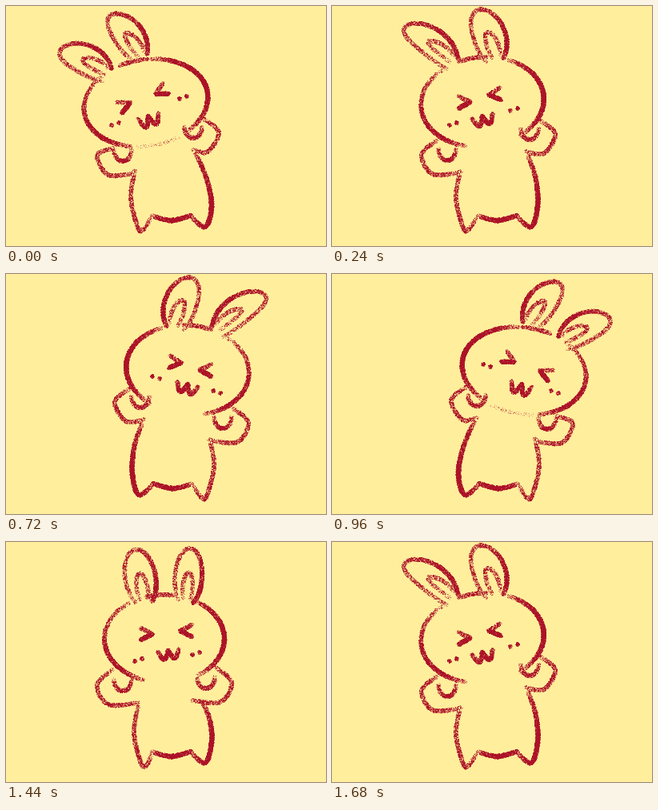
An HTML page with a canvas for the animation above (1.92 s loop, 400 px wide and 300 px high).

```html
<!DOCTYPE html>
<html lang="en">
<head>
<meta charset="utf-8">
<title>Dancing rabbit</title>
<style>
html, body { margin: 0; width: 100%; height: 100%; overflow: hidden; background: #ffee9c; }
canvas { display: block; width: 100%; height: 100%; }
</style>
</head>
<body>
<canvas id="stage" width="400" height="300"></canvas>
<script>
const W = 400, H = 300, STEP = 240, AXIS = 415;
const INK = [172, 18, 40], PAPER = '#ffee9c';
const DEG = Math.PI / 180;

let seed = 7;
const rand = () => {
  seed = (seed + 0x6D2B79F5) | 0;
  let t = Math.imul(seed ^ (seed >>> 15), 1 | seed);
  t = (t + Math.imul(t ^ (t >>> 7), 61 | t)) ^ t;
  return ((t ^ (t >>> 14)) >>> 0) / 4294967296;
};

// Paper grain: fine noise mixed with a slightly coarser one
const fine = Float32Array.from({ length: W * H }, rand);
const grain = fine.map((v, i) => {
  const x = i % W, y = (i / W) | 0;
  return 0.6 * v + 0.4 * fine[(y >> 1) * W + (x >> 1)];
});

// Value at t on an evenly spaced list
const ramp = (list, t) => {
  const p = t * (list.length - 1), i = Math.min(p | 0, list.length - 2);
  return list[i] + (list[i + 1] - list[i]) * (p - i);
};

const spline = (a, b, c, d, t) =>
  b + 0.5 * t * (c - a + t * (2 * a - 5 * b + 4 * c - d + t * (3 * (b - c) + d - a)));

// Point at (along, across), turned by deg and moved to x, y
const place = (x, y, deg, along, across) => {
  const c = Math.cos(deg * DEG), s = Math.sin(deg * DEG);
  return [x + along * c - across * s, y + along * s + across * c];
};

class Rabbit {
  cover = new Float32Array(W * H);

  // The wetter the crayon, the wider its mark
  stamp(cx, cy, load, r = 2.6 + load) {
    for (let y = Math.max(0, Math.floor(cy - r)); y <= Math.min(H - 1, cy + r); y++)
      for (let x = Math.max(0, Math.floor(cx - r)); x <= Math.min(W - 1, cx + r); x++) {
        const q = ((x + 0.5 - cx) ** 2 + (y + 0.5 - cy) ** 2) / (r * r);
        const i = y * W + x;
        if (q < 1) this.cover[i] = Math.max(this.cover[i], load * (1 - q ** 3));
      }
  }

  // Stroke along at(u), u from 0 to 1, drying out at both ends
  stroke(loads, at) {
    for (let i = 0; i <= 250; i++) {
      const u = i / 250, dry = 0.75 + 0.25 * Math.min(1, 8 * u, 8 * (1 - u));
      this.stamp(...at(u), ramp(loads, u) * dry);
    }
  }

  curve(loads, ...pts) {
    const n = pts.length - 1, pick = i => pts[Math.max(0, Math.min(n, i))];
    this.stroke(loads, u => {
      const i = Math.min(Math.floor(u * n), n - 1), t = u * n - i;
      return [0, 1].map(k => spline(pick(i - 1)[k], pick(i)[k], pick(i + 1)[k], pick(i + 2)[k], t));
    });
  }

  arc(loads, x, y, rx, ry, tilt, from, to) {
    this.stroke(loads, u => {
      const a = (from + (to - from) * u) * DEG;
      return place(x, y, tilt, rx * Math.cos(a), ry * Math.sin(a));
    });
  }

  head(x, y, rx, ry, tilt, nape = 300) {
    const part = (loads, from, to) => this.arc(loads, x, y, rx, ry, tilt, from, to);
    part([.65, .75, 1, 1.1, .8], 234, 111);
    part([.85, .8], 252, 278);
    part([.8, 1.1, 1.25, 1.1, .7], nape, 416);
  }

  // An ellipse open at its base; droop bows its ends sideways
  ear(x, y, len, wide, lean, droop = 0) {
    const loop = (loads, cx, cy, a, b, bow, from, to) => this.stroke(loads, u => {
      const t = (from + (to - from) * u) * DEG, c = Math.cos(t);
      return place(cx, cy, lean - 90, a * c, b * Math.sin(t) - bow * c * c);
    });
    loop([.7, .7, .75, .95, 1.25], x, y, len, wide, droop, -142, 150);
    const [ix, iy] = place(x, y, lean + 90, len * .38, 0);
    loop([.6, .75, .65], ix, iy, len * .54, wide * .36, droop / 3, -130, 130);
  }

  // Squeezed eye: two arms from one corner; side is where they open
  eye(x, y, side, tilt) {
    for (const [turn, load] of [[-27, .85], [27, 1.15]]) {
      const end = place(x, y, tilt + turn * side, 16 * side, 0);
      this.curve([load, load], [x, y], end);
    }
  }

  mouth(x, y, deep, tilt) {
    this.stroke([1, 1.1, 1], u =>
      place(x, y, tilt, 26 * (u - .5), deep * Math.abs(Math.sin(2 * Math.PI * u))));
  }

  cheek(x, y) {
    this.stamp(x, y, 1, 3.3);
    this.stamp(x + 9, y - 3, 1, 3.3);
  }

  arm(x, y, side, lift, reach) {
    this.curve([.75, .8, .85, .75], [x + 7 * side, y - lift], [x + 26 * side, y - 3],
      [x + 12 * side, y + 21], [x - reach * side, y + 19]);
    this.arc([.75, 1, .75], x - 6 * side, y - 10, 11, 14, 0, 0, 180);
  }

  body(lx, ly, rx, ry) {
    this.curve([.75, .85, .9, .8, .7], [lx, ly], [lx - 5, 240], [lx + 4, 277], [lx + 11, 279], [183, 262]);
    this.curve([.85, 1.25, 1], [184, 263], [207, 268], [231, 262]);
    this.curve([.75, 1.05, 1.2, 1.1, .9], [rx, ry], [rx / 2 + 132, ry / 2 + 122], [257, 250], [249, 276], [231, 263]);
  }

  print() {
    const sheet = document.createElement('canvas');
    sheet.width = W;
    sheet.height = H;
    const g = sheet.getContext('2d'), img = g.createImageData(W, H);
    this.cover.forEach((c, i) => {
      if (c) img.data.set([...INK, 255 * Math.max(0, Math.min(1, (c - grain[i]) * 1.8 + .3))], i * 4);
    });
    g.putImageData(img, 0, 0);
    return sheet;
  }
}

function makePose(draw) {
  const rabbit = new Rabbit();
  draw(rabbit);
  return rabbit.print();
}

const far = makePose(r => {
  r.head(175, 121, 78, 54, -10, 282);
  r.arc([.3, .4, .3], 175, 121, 78, 54, -10, 105, 65);
  r.ear(102, 68, 36, 18, -62, 5);
  r.ear(154, 38, 35, 18, -35, 4);
  r.eye(155, 121, -1, -25);
  r.eye(187, 110, 1, -28);
  r.mouth(178, 138, 12, -16);
  r.cheek(132, 149);
  r.cheek(217, 116);
  r.arm(140, 190, -1, 12, 20);
  r.arm(240, 161, 1, 20, 6);
  r.body(161, 206, 236, 183);
});

const near = makePose(r => {
  r.head(188, 120, 77, 56, -6);
  r.ear(127, 47, 41, 17, -52, 6);
  r.ear(197, 38, 36, 20, -19, 3);
  r.eye(173, 120, -1, -2);
  r.eye(196, 111, 1, -5);
  r.mouth(188, 138, 11, -14);
  r.cheek(147, 149);
  r.cheek(223, 131);
  r.arm(138, 189, -1, 21, 23);
  r.arm(253, 163, 1, 20, 10);
  r.body(160, 207, 245, 187);
});

const mid = makePose(r => {
  r.head(198, 121, 75, 55, 0);
  r.ear(168, 45, 36, 19, -10);
  r.ear(228, 44, 36, 17, 4);
  r.eye(183, 115, -1, 0);
  r.eye(218, 111, 1, 0);
  r.mouth(203, 136, 10, -7);
  r.cheek(161, 149);
  r.cheek(233, 141);
  r.arm(140, 182, -1, 22, 25);
  r.arm(256, 179, 1, 22, 23);
  r.body(165, 206, 245, 199);
});

// [pose, mirrored]
const sway = [[far], [near], [mid], [near, true], [far, true], [near, true], [mid], [near]];
const ctx = document.getElementById('stage').getContext('2d');
const start = performance.now();

function tick() {
  const [pose, flip] = sway[Math.floor((performance.now() - start) / STEP) % sway.length];
  ctx.setTransform(1, 0, 0, 1, 0, 0);
  ctx.fillStyle = PAPER;
  ctx.fillRect(0, 0, W, H);
  if (flip) ctx.setTransform(-1, 0, 0, 1, AXIS, 0);
  ctx.drawImage(pose, 0, 0);
  requestAnimationFrame(tick);
}
tick();
</script>
</body>
</html>
```
